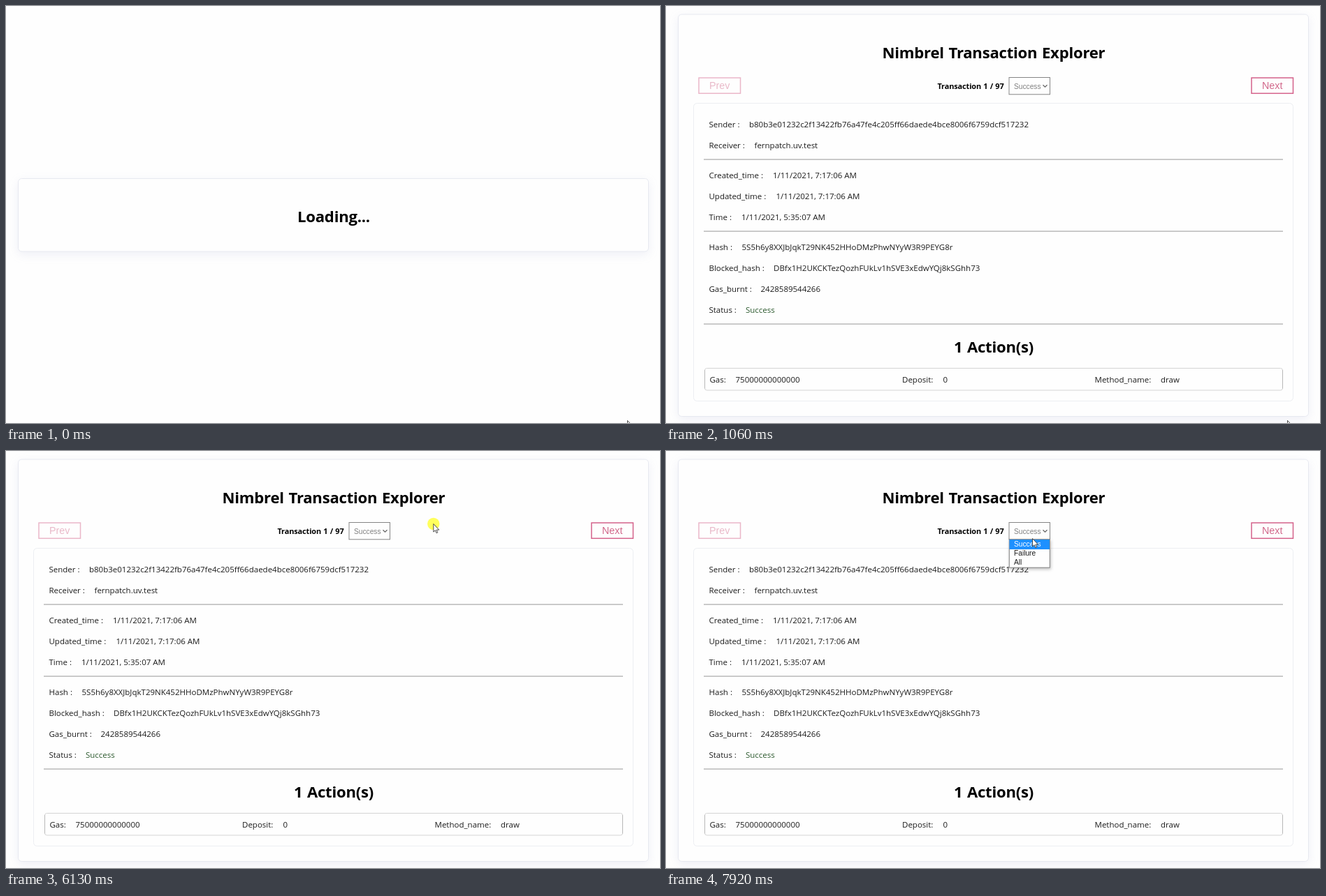
An HTML page for the animation above (7990 ms loop, 936 by 598 pixels).

```html
<!DOCTYPE html>
<html lang="en">
<head>
<meta charset="utf-8">
<title>Transaction Explorer</title>
<style>
  html, body { margin: 0; width: 100%; height: 100%; overflow: hidden; background: #fefefe; }
  svg { display: block; width: 936px; height: 598px; }
  text { font-family: "Open Sans", "Noto Sans", sans-serif; font-size: 11.5px; fill: #1c1c1c; white-space: pre; }
  .bold { font-weight: 700; letter-spacing: -.01em; word-spacing: .05em; fill: #000; text-anchor: middle; }
  .head { font-size: 22.1px; }
  .count { font-size: 10.9px; }
  .small { font-size: 8.3px; }
  .mid { text-anchor: middle; }
  .arial { font-family: "Liberation Sans", Arial, sans-serif; }
  .btn { font-size: 14.3px; fill: #d2688b; text-anchor: middle; }
  .opt { font-size: 10.2px; }
  .card { fill: #fefefe; stroke: #e7e9f0; filter: drop-shadow(0 4px 7px rgba(120, 135, 190, .12)); }
  .box { fill: none; stroke: #d4628a; stroke-width: 1.5; }
</style>
</head>
<body>
<svg viewBox="0 0 936 598">
  <g id="loading">
    <rect class="card" x="17.5" y="247.5" width="902" height="104.5" rx="5"/>
    <text class="bold head" x="469" y="310">Loading...</text>
  </g>

  <g id="page">
    <rect class="card" x="17.5" y="12" width="902" height="576.5" rx="5"/>
    <text class="bold head" x="469" y="75">Nimbrel Transaction Explorer</text>
    <g opacity=".46">
      <rect class="box" x="47" y="103" width="59.5" height="22.3"/>
      <text class="arial btn" x="76.7" y="119">Prev</text>
    </g>
    <rect class="box" x="838" y="103" width="59.5" height="22.3"/>
    <text class="arial btn" x="867.7" y="119">Next</text>
    <text class="bold count" x="436" y="119">Transaction 1 / 97</text>
    <rect x="491" y="102.5" width="58.5" height="24.3" fill="#fefefe" stroke="#858585"/>
    <text class="arial opt" x="498" y="119" style="fill:#808080">Success</text>
    <path d="M539.5 113.2l3 3 3-3" fill="none" stroke="#666" stroke-width="1.3"/>
    <rect x="39.5" y="139.5" width="858" height="427" rx="5" fill="none" stroke="#eceef2"/>
    <g id="rows"></g>
    <text class="bold head" x="469" y="497">1 Action(s)</text>
    <rect x="55.5" y="519.5" width="827" height="31.5" rx="3" fill="none" stroke="#d4d4d4"/>
    <path d="M55.5 522v26.5M882.5 522v26.5" stroke="#b8b8b8"/>
  </g>

  <g id="dialog">
    <rect x="308.5" y="-20" width="321" height="82.5" rx="3" fill="#fefefe" stroke="#bcbcbc"
      style="filter:drop-shadow(0 1px 1px rgba(0,0,0,.25))"/>
    <rect x="321.5" y="-3.5" width="8.5" height="8.8" rx="1" fill="none" stroke="#555" stroke-width="1.2"/>
    <text class="small" x="340" y="4.4" style="fill:#333">Don't ask me again</text>
    <rect x="506" y="27.5" width="53" height="23.3" rx="3" fill="#fefefe" stroke="#1a73e8" stroke-width="1.6"/>
    <rect x="508" y="29.5" width="49" height="19.3" rx="1.5" fill="#1a73e8"/>
    <text class="small mid" x="532.3" y="42.2" style="fill:#fff;font-weight:600">Turn on</text>
    <rect x="565" y="28" width="52.5" height="22.5" rx="2.5" fill="#fefefe" stroke="#dadce0"/>
    <text class="small mid" x="591" y="42.2" style="fill:#2a66c8">Cancel</text>
  </g>

  <g id="menu">
    <rect x="491.3" y="126.8" width="58" height="40.4" fill="#fefefe" stroke="#808080"
      style="filter:drop-shadow(1px 2px 2px rgba(0,0,0,.25))"/>
    <rect x="491.5" y="127" width="57.5" height="14" fill="#1e90ff"/>
    <text class="arial opt" x="498" y="137.4" style="fill:#fff">Success</text>
    <text class="arial opt" x="498" y="150.3">Failure</text>
    <text class="arial opt" x="498" y="163.3">All</text>
  </g>

  <g id="cursor">
    <circle id="click" r="8.7" fill="#ffff5c"/>
    <path d="M0 0V11.5L2.6 9.2 4.3 13.2 6 12.4 4.4 8.6H8Z" fill="#fff" stroke="#222" stroke-width=".8"/>
  </g>
</svg>
<script>
const LOOP = 7990, TICK = 70;
const $ = id => document.getElementById(id);

function add(name, attrs, content = "") {
  const el = document.createElementNS("http://www.w3.org/2000/svg", name);
  for (const key in attrs) el.setAttribute(key, attrs[key]);
  el.textContent = content;
  $("rows").append(el);
}

// baseline, label, value x, value, label x
const rows = [
  [173.8, "Sender :", 119, "b80b3e01232c2f13422fb76a47fe4c205ff66daede4bce8006f6759dcf517232"],
  [203.8, "Receiver :", 126.5, "fernpatch.uv.test"],
  [246.8, "Created_time :", 153, "1/11/2021, 7:17:06 AM"],
  [276.8, "Updated_time :", 157.5, "1/11/2021, 7:17:06 AM"],
  [306.8, "Time :", 108, "1/11/2021, 5:35:07 AM"],
  [349.8, "Hash :", 108.5, "5S5h6y8XXJbJqkT29NK452HHoDMzPhwNYyW3R9PEYG8r"],
  [379.8, "Blocked_hash :", 154, "DBfx1H2UKCKTezQozhFUkLv1hSVE3xEdwYQj8kSGhh73"],
  [409.8, "Gas_burnt :", 135.5, "2428589544266"],
  [439.8, "Status :", 114, "Success"],
  [540, "Gas:", 99.5, "75000000000000", 62.5],
  [540, "Deposit:", 396.5, "0", 338],
  [540, "Method_name:", 708, "draw", 613.5]
];
for (const [y, label, valueX, value, x = 61.5] of rows) {
  add("text", { x, y }, label);
  add("text", { x: valueX, y, style: value === "Success" ? "fill:#2b592d" : "" }, value);
}
for (const y of [219.4, 322.4, 455.4])
  add("rect", { x: 54, y, width: 829, height: 1.3, fill: "#b0b0b0" });

// time, x, y of the pointer tip
const path = [
  [0, 889.5, 594.5], [4730, 889.5, 594], [5080, 348, 190], [5430, 772, 42],
  [5490, 772, 42], [5980, 611.8, 104.5], [6340, 611.8, 104.5], [6820, 467, 130],
  [6950, 467, 130], [7230, 516, 124.5], [7360, 516, 124.5], [7430, 518, 119],
  [7850, 518, 119], [7920, 524.5, 125.5], [LOOP, 524.5, 125.5]
];
const ease = p => p * p * (3 - 2 * p);
const within = (t, from, to) => t >= from && t < to;
const show = (id, on) => $(id).setAttribute("display", on ? "inline" : "none");

function pointer(t) {
  const i = path.findIndex(key => key[0] > t);
  const [t0, x0, y0] = path[i - 1], [t1, x1, y1] = path[i];
  const p = ease(Math.floor((t - t0) / TICK) * TICK / (t1 - t0));
  return [x0 + (x1 - x0) * p, y0 + (y1 - y0) * p];
}

function draw(t) {
  show("loading", t < 860);
  show("page", t >= 860);
  show("dialog", within(t, 70, 1060));
  const step = Math.min(4, Math.floor((t - 70) / 63.3) + 1) / 4;
  $("dialog").setAttribute("opacity", step);
  $("dialog").setAttribute("transform", `translate(0 ${-12 * (1 - step) ** 2})`);
  show("menu", t >= 7640);
  show("click", within(t, 6130, 6340) || within(t, 7570, 7720));
  $("cursor").setAttribute("transform", `translate(${pointer(t)})`);
}

const start = performance.now();
function frame() {
  draw((performance.now() - start) % LOOP);
  requestAnimationFrame(frame);
}
frame();
</script>
</body>
</html>
```
